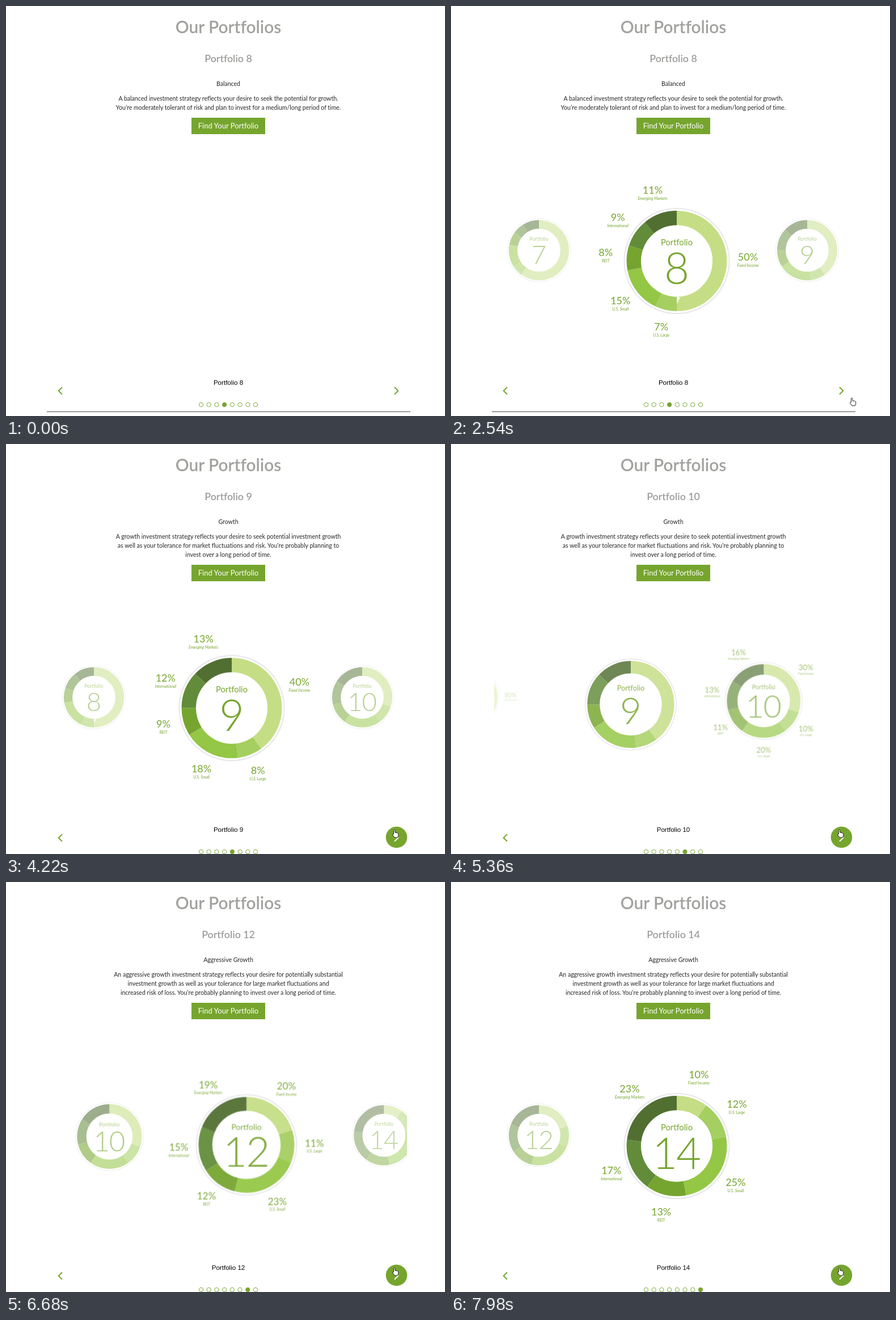
Animation of 774 by 723 pixels, one loop 8 s. Source, as an HTML page:

```html
<!DOCTYPE html>
<html lang="en">
<head>
<meta charset="utf-8">
<title>Our Portfolios</title>
<style>
  html, body { margin: 0; width: 100%; height: 100%; overflow: hidden; background: #fff; }
  svg { display: block; width: 774px; height: 723px; font-family: Lato, "Open Sans", sans-serif; }
  text { text-anchor: middle; font-variant-ligatures: none; }
  .title { font-size: 29.8px; font-weight: 600; fill: #a1a19e; }
  .heading { font-size: 17.8px; font-weight: 600; fill: #9c9c9a; }
  .copy { font-size: 10.55px; fill: #26262a; }
  .button { font-size: 13px; fill: #fff; }
  .caption { font: 11.6px "Liberation Sans", Arial, sans-serif; fill: #000; }
  .chart text { fill: #76a52e; }
  .chart .name { font-size: 14.7px; }
  .chart .number { font-size: 76px; font-weight: 300; letter-spacing: -2px; }
  .chart .percent { font-size: 18px; }
  .chart .asset { font-size: 7px; font-style: italic; }
  .chevron { fill: none; stroke: #76a52e; stroke-width: 2; }
  .dot { stroke: #7dab38; stroke-width: 1; }
</style>
</head>
<body>
<svg id="stage" viewBox="0 0 774 723">
  <clipPath id="window"><rect x="76" y="240" width="631" height="420"/></clipPath>
  <text class="title" x="392" y="47.5">Our Portfolios</text>
  <text class="heading" id="heading" x="392" y="98.5"></text>
  <text class="copy" id="kind" x="392" y="141"></text>
  <g id="copy"></g>
  <g id="charts" clip-path="url(#window)"></g>
  <g id="lower">
    <rect x="327" y="197" width="130" height="29" fill="#76a52e"/>
    <text class="button" x="392" y="216">Find Your Portfolio</text>
    <text class="caption" id="caption" x="392" y="668"></text>
    <path class="chevron" d="M99 672.2l-6.3 6.3 6.3 6.3"/>
    <circle id="hover" cx="688.5" cy="677.5" r="18.8" fill="#76a52e"/>
    <path class="chevron" id="next" d="M685 672.2l6.3 6.3-6.3 6.3"/>
    <g id="dots"></g>
    <path d="M72 715.5H713" stroke="#4a4a4a"/>
  </g>
  <path id="cursor" fill="#fff" stroke="#222" stroke-linejoin="round"
    d="M-3.500 1V-5.500a1.200 1.200 0 0 1 2.400 0V-2l4.500 1q1.300 .4 1.300 1.800V3.500L3.500 7H-2L-5.500 2q0-1.800 2-1z"/>
</svg>
<script>
const LOOP = 8000;
const SHIFT = 16;        // the third line of copy pushes the page down
const MOVE = 500, POP = 300;
const clicks = [3400, 4950, 6000, 6950];
const moves = [3555, 5165, 6290, 7220];

const colors = ['#c5de85', '#a5cf60', '#94c745', '#75a52f', '#628c3a', '#526f32'];
const assets = ['Fixed Income', 'U.S. Large', 'U.S. Small', 'REIT', 'International', 'Emerging Markets'];
const portfolios = [
  [7, 60, 6, 12, 7, 6, 9],
  [8, 50, 7, 15, 8, 9, 11],
  [9, 40, 8, 18, 9, 12, 13],
  [10, 30, 10, 20, 11, 13, 16],
  [12, 20, 11, 23, 12, 15, 19],
  [14, 10, 12, 25, 13, 17, 23]
];
const strategies = {
  Balanced: [
    'A balanced investment strategy reflects your desire to seek the potential for growth.',
    'You’re moderately tolerant of risk and plan to invest for a medium/long period of time.'],
  Growth: [
    'A growth investment strategy reflects your desire to seek potential investment growth',
    'as well as your tolerance for market fluctuations and risk. You’re probably planning to',
    'invest over a long period of time.'],
  'Aggressive Growth': [
    'An aggressive growth investment strategy reflects your desire for potentially substantial',
    'investment growth as well as your tolerance for large market fluctuations and',
    'increased risk of loss. You’re probably planning to invest over a long period of time.']
};
const kinds = ['Balanced', 'Growth', 'Growth', 'Aggressive Growth', 'Aggressive Growth'];

// Carousel places from two left of centre to two right of it.
const slots = {
  x: [155, 155, 398, 628, 968],
  y: [430.7, 430.7, 449.6, 430.7, 430.7],
  scale: [.6, .6, 1, .6, .6],
  opacity: [0, .5, 1, .5, 0]
};

const $ = id => document.getElementById(id);
const clamp = v => Math.min(1, Math.max(0, v));
const ramp = (t, start, length) => clamp((t - start) / length);
const swing = p => .5 - Math.cos(p * Math.PI) / 2;
const ease = (t, start, length) => start === undefined ? 0 : swing(ramp(t, start, length));

// A chart leaving on the left gathers speed as it goes.
const exitShift = offset => 470 * clamp(-1 - offset) ** 1.2;

function add(parent, tag, attrs, text) {
  const node = document.createElementNS('http://www.w3.org/2000/svg', tag);
  for (const key in attrs) node.setAttribute(key, attrs[key]);
  if (text !== undefined) node.textContent = text;
  return parent.appendChild(node);
}

function at(list, offset) {
  const p = Math.min(4, Math.max(0, offset + 2));
  const i = Math.min(3, Math.floor(p));
  return list[i] + (list[i + 1] - list[i]) * (p - i);
}

function buildChart([number, ...shares]) {
  const root = add($('charts'), 'g', { class: 'chart' });
  const labels = add(root, 'g');
  const face = add(root, 'g');
  add(face, 'circle', { r: 92.6, fill: '#fff', stroke: '#e7e7ea', 'stroke-width': 2 });
  const ring = add(face, 'g', { transform: 'rotate(-90)' });
  let start = 0;
  const parts = shares.map((share, i) => {
    const arc = add(ring, 'circle', {
      r: 75.8, fill: 'none', stroke: colors[i], 'stroke-width': 25.4,
      pathLength: 100, 'stroke-dashoffset': -start
    });
    const label = add(labels, 'g');
    add(label, 'text', { class: 'percent', y: -.5 }, share + '%');
    add(label, 'text', { class: 'asset', y: 10.5 }, assets[i]);
    const part = { arc, label, share, start, angle: (start + share / 2) * Math.PI / 50 };
    start += share;
    return part;
  });
  add(face, 'text', { class: 'name', y: -28 }, 'Portfolio');
  add(face, 'text', { class: 'number', x: -1, y: 40 }, number);
  return { root, labels, face, ring, parts };
}

const charts = portfolios.map(buildChart);
const dots = Array.from({ length: 8 }, (_, i) =>
  add($('dots'), 'circle', { class: 'dot', cx: 344 + i * 13.71, cy: 703, r: 3.7 }));

let shownPage = -1;
function showPage(page) {
  if (page === shownPage) return;
  shownPage = page;
  const name = 'Portfolio ' + portfolios[page + 1][0];
  $('heading').textContent = $('caption').textContent = name;
  $('kind').textContent = kinds[page];
  $('copy').replaceChildren();
  strategies[kinds[page]].forEach((line, i) =>
    add($('copy'), 'text', { class: 'copy', x: 392, y: 167 + i * 15.8 }, line));
  dots.forEach((dot, i) => dot.setAttribute('fill', i === page + 3 ? '#76a52e' : '#fff'));
  $('lower').setAttribute('transform', `translate(0 ${page ? SHIFT : 0})`);
}

function drawChart(chart, i, t, centre, shift) {
  const offset = i - centre;
  const opacity = at(slots.opacity, offset);
  chart.root.style.display = opacity > 0 ? '' : 'none';
  if (!opacity) return;
  const x = at(slots.x, offset) - exitShift(offset);
  const y = at(slots.y, offset) + shift;
  chart.root.setAttribute('opacity', opacity);
  chart.root.setAttribute('transform', `translate(${x} ${y}) scale(${at(slots.scale, offset)})`);
  chart.face.setAttribute('opacity', ramp(t, 60, 640));
  chart.ring.setAttribute('opacity', i === 1 ? 1 : .3 + .7 * ramp(t, 1480, 400));

  // Labels slide out beside the centre, and back in when their chart leaves it.
  const firstShow = i === 1 ? 1650 : clicks[i - 2];
  const out = ease(t, firstShow, POP) - ease(t, clicks[i - 1], POP) + ease(t, clicks[i], POP);
  chart.labels.setAttribute('opacity', out);
  const sweep = 100 * ease(t, 850, 570);
  for (const { arc, label, share, start, angle } of chart.parts) {
    const length = Math.min(share, Math.max(0, sweep - start));
    arc.setAttribute('stroke-dasharray', `${length} 200`);
    arc.style.display = length ? '' : 'none';
    const r = 125.5 * out;
    label.setAttribute('transform', `translate(${r * Math.sin(angle)} ${-r * Math.cos(angle)})`);
  }
}

function drawCursor(t) {
  const p = ease(t, 2200, 520);
  $('cursor').style.display = p ? '' : 'none';
  $('cursor').setAttribute('transform', `translate(${770 - 83 * p} ${728 - 41 * p})`);
  const over = ramp(t, 2560, 150);
  $('hover').setAttribute('opacity', over);
  $('next').style.stroke = over > .5 ? '#fff' : '';
}

function frame(now) {
  const t = now % LOOP;
  const page = clicks.filter(click => t >= click).length;
  const centre = 1 + moves.reduce((sum, start) => sum + ease(t, start, MOVE), 0);
  showPage(page);
  charts.forEach((chart, i) => drawChart(chart, i, t, centre, page ? SHIFT : 0));
  drawCursor(t);
  requestAnimationFrame(() => frame(performance.now()));
}
frame(performance.now());
</script>
</body>
</html>
```
